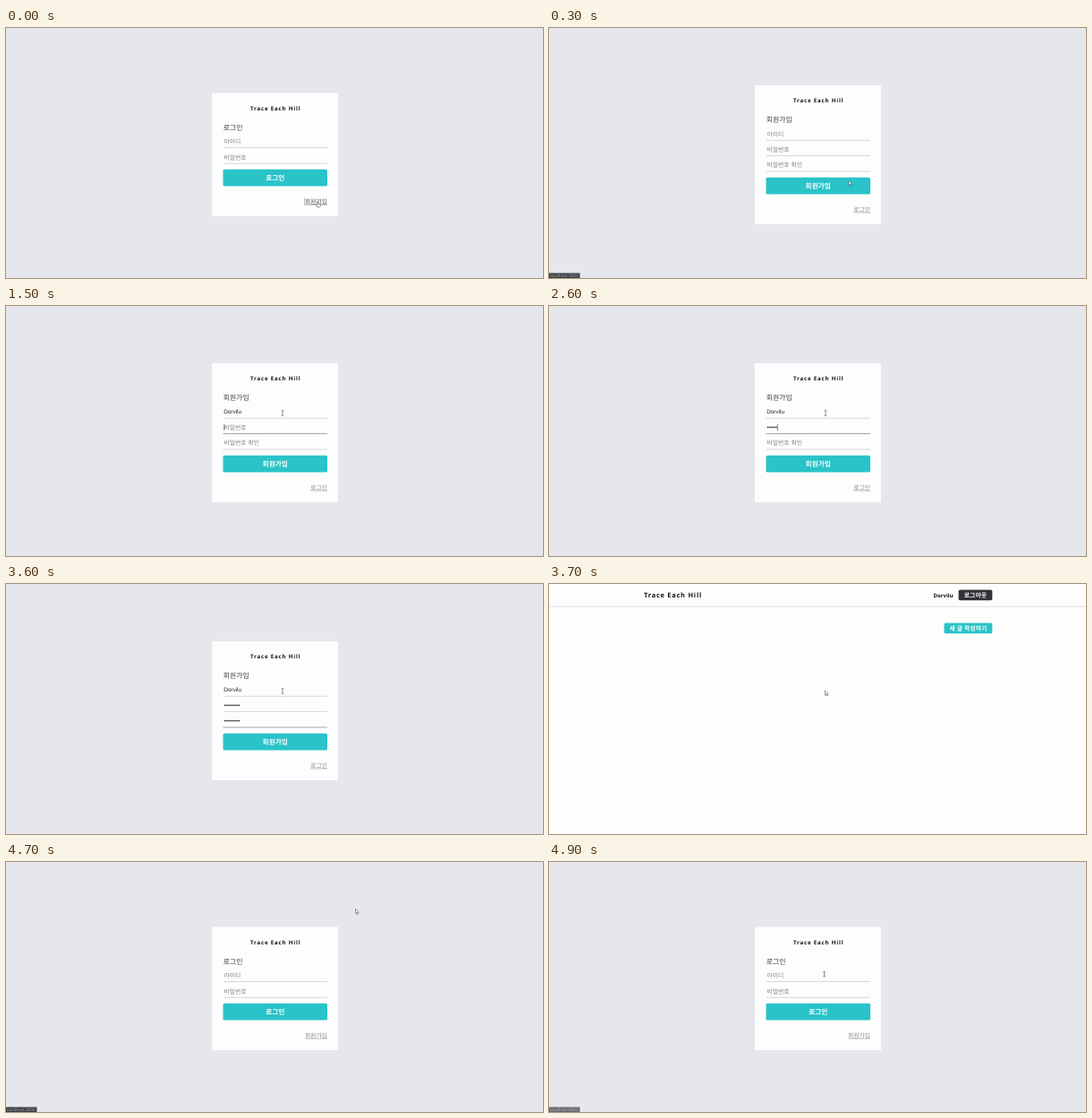
An HTML page for the animation above (5 s loop, 600 by 279 pixels).

```html
<!DOCTYPE html>
<html lang="ko">
<head>
<meta charset="utf-8">
<style>
html, body { margin: 0; width: 100%; height: 100%; overflow: hidden; }
svg { display: block; width: 100%; height: 100%; }
text { font-family: "Noto Sans CJK KR", "Noto Sans CJK", sans-serif; text-rendering: geometricPrecision; white-space: pre; }
.latin { font-family: "Open Sans", "Noto Sans CJK KR", sans-serif; }
.brand { font-family: "Open Sans", sans-serif; letter-spacing: .78px; }
.typed { font-family: "Liberation Sans", Arial, sans-serif; }
</style>
</head>
<body>
<svg id="stage" viewBox="0 0 600 279"></svg>
<script>
const stage = document.getElementById('stage');
const CYAN = '#29c3c8', DARK = '#303237', GRAY = '#868a8e';
const BRAND = 'Trace Each Hill', USER = 'Dorvilu';
const SUGGESTIONS = ['tal0452', 'root', 'talbren@example.com', 'admin', 'tal0452@example.kr', '윤태솔'];

const clamp = (v, lo, hi) => Math.max(lo, Math.min(hi, v));
const rect = (x, y, w, h, fill, extra = '') =>
  `<rect x="${x}" y="${y}" width="${w}" height="${h}" fill="${fill}" ${extra}/>`;

// cy is the visual middle of the line
function text(s, x, cy, size, fill, { weight = 400, anchor = 'start', cls = '' } = {}) {
  return `<text x="${x}" y="${cy + size * .37}" font-size="${size}" fill="${fill}" font-weight="${weight}" text-anchor="${anchor}" class="${cls}">${s}</text>`;
}
const button = (label, x, y, w, h, fill, color = '#fff', size = 6.9) =>
  rect(x, y, w, h, fill, 'rx="1.6"') +
  text(label, x + w / 2, y + h / 2, size, color, { weight: 700, anchor: 'middle' });
const caret = (x, y) => rect(x, y, .6, 7.2, '#222');
const rule = (y, focused) => rect(242.5, y, 116.5, .8, focused ? '#8b908e' : '#cdced3');
const hint = (s, cy) => text(s, 243.6, cy, 6.8, '#818181');

function dots(n, cy) {
  let out = '';
  for (let i = 0; i < n; i++) out += `<circle cx="${244.6 + i * 2.25}" cy="${cy}" r=".9" fill="#222"/>`;
  return out;
}

function cursor(kind, x, y) {
  const shapes = {
    arrow: '<path d="M0 0V5.2L1.2 4.1L2 6L2.9 5.6L2.1 3.8H3.7Z" fill="#fff" stroke="#333" stroke-width=".5"/>',
    beam: '<path d="M-1.2 -2.8H1.2M0 -2.8V2.8M-1.2 2.8H1.2" fill="none" stroke="#444" stroke-width=".6"/>',
    hand: '<path d="M-.5 -2.5Q0 -3 .5 -2.5V-.5L2.5 .1Q3 .3 2.8 1.5L2.2 3.4H-.8L-2.2 1Q-2 .1 -1.1 .8L-.5 1.2Z" fill="#fff" stroke="#333" stroke-width=".5"/>'
  };
  return `<g transform="translate(${x} ${y})">${shapes[kind]}</g>`;
}

const statusBar = opacity => `<g opacity="${opacity}">${rect(0, 273.5, 34.5, 5.5, '#3c3d41')}` +
  text('localhost:3000', 1, 276.7, 4.7, '#a9abb0', { cls: 'latin' }) + '</g>';

function card(top, height, heading, action, link, hover) {
  const bottom = top + height, linkY = bottom - 16.7, linkX = 359 - link.length * 6.28;
  const color = hover ? '#555' : GRAY;
  return rect(0, 0, 600, 279, '#e6e7ec') +
    rect(230, top, 141, height, '#fefdfe') +
    text(BRAND, 273, top + 17.2, 6.2, '#111', { weight: 700, cls: 'brand' }) +
    text(heading, 242.7, top + 38.4, 7.9, '#3b3d40', { weight: 500 }) +
    button(action, 242.5, bottom - 52.3, 116.5, 18.8, CYAN, '#fff', 7.7) +
    text(link, 359, linkY, 6.8, color, { anchor: 'end' }) +
    rect(linkX, linkY + 3.4, 359 - linkX, .6, color);
}

const login = hover => card(72.5, 137.5, '로그인', '로그인', '회원가입', hover) +
  hint('아이디', 126.5) + rule(133) + hint('비밀번호', 144) + rule(150.8) +
  (hover ? rect(333, 189.3, .5, 8, '#777') : '');

function signup(k) {
  const name = clamp(Math.floor((k - 9) * 1.4), 0, USER.length);
  const pass = clamp(Math.floor((k - 22) * 1.4), 0, 8);
  const again = clamp((k - 29) * 2, 0, 8);
  const focus = k < 6 ? -1 : k < 15 ? 0 : k < 28 ? 1 : 2;
  const blinkOff = k === 8 || k === 9 || k === 18 || k === 19 || k >= 36;
  let out = card(64, 155, '회원가입', '회원가입', '로그인') +
    (name ? text(USER.slice(0, name), 243.2, 118, 6.4, '#222', { cls: 'typed' }) : hint('아이디', 118)) +
    (pass ? dots(pass, 135.3) : hint('비밀번호', 135.2)) +
    (again ? dots(again, 152.6) : hint('비밀번호 확인', 152.5)) +
    [124.8, 142, 159.6].map((y, i) => rule(y, i === focus)).join('');
  if (focus >= 0 && !blinkOff) {
    const nameEnd = [0, .722, 1.278, 1.611, 2.111, 2.333, 2.555, 3.111][name] * 6.4;
    out += caret(243.6 + [nameEnd, pass * 2.25, again * 2.25][focus], [114.4, 131.8, 149.3][focus]);
  }
  if (k >= 6 && k < 10) {
    out += rect(242.2, 125, 117, 92.2, '#b9bac0', 'rx=".8"') + rect(242.7, 125.2, 115.8, 91, '#fefefe', 'rx=".6"') +
      SUGGESTIONS.map((s, i) => text(s, 247.3, 135 + i * 14.1, 5.2, '#333', { cls: 'latin' })).join('');
  }
  return out;
}

function posts(user, hover, list) {
  const y = user ? 74 : 62.4;
  return rect(0, 0, 600, 279, '#fefdfe') + rect(0, 24.7, 600, .9, '#dcdcdf') +
    text(BRAND, 106, 12.5, 7.4, '#111', { weight: 700, cls: 'brand' }) +
    (user
      ? text(USER, 451.5, 12.8, 6, '#111', { weight: 700, anchor: 'end', cls: 'latin' }) +
        button('로그아웃', 457.6, 6.6, 37.7, 11.6, hover ? GRAY : DARK) +
        button('새 글 작성하기', 441.5, 43.5, 53.8, 11.7, CYAN)
      : button('로그인', 463.8, 6.6, 31.5, 11.6, hover ? GRAY : DARK)) +
    (list
      ? button('이전', 237.8, y, 25.4, 11.7, '#dedfe2', '#adb1b6') +
        text('1', 300.5, y + 5.2, 6, '#222', { anchor: 'middle', cls: 'latin' }) +
        button('다음', 338, y, 25.5, 11.7, DARK)
      : '');
}

function scene(k) {
  if (k < 3) return login(true) + (k === 2 ? statusBar(1) : '') + cursor('hand', 348.5, 196.5);
  if (k < 37) {
    const p = clamp((k - 2) / 3, 0, 1);
    return signup(k) + (k === 3 ? statusBar(1) : k === 4 ? statusBar(.6) : '') +
      cursor(p < 1 ? 'arrow' : 'beam', 348 - 39 * p, 196 - 76.5 * p);
  }
  if (k < 47) {
    const p = clamp((k - 38) / 4, 0, 1);
    return posts(k < 43, k >= 42, k >= 38) +
      cursor(p < 1 ? 'arrow' : 'hand', 308.5 + 156 * p, 119 - 105 * p);
  }
  const p = (k - 47) / 2;
  return login(false) + statusBar(k < 49 ? 1 : .75) +
    cursor(p < 1 ? 'arrow' : 'beam', 390.5 - 83 * p, 52.5 + 72.5 * p);
}

let shown = -1;
const start = performance.now();
function tick() {
  const k = Math.floor((performance.now() - start) % 5000 / 100);
  if (k !== shown) stage.innerHTML = scene(shown = k);
  requestAnimationFrame(tick);
}
tick();
</script>
</body>
</html>
```
